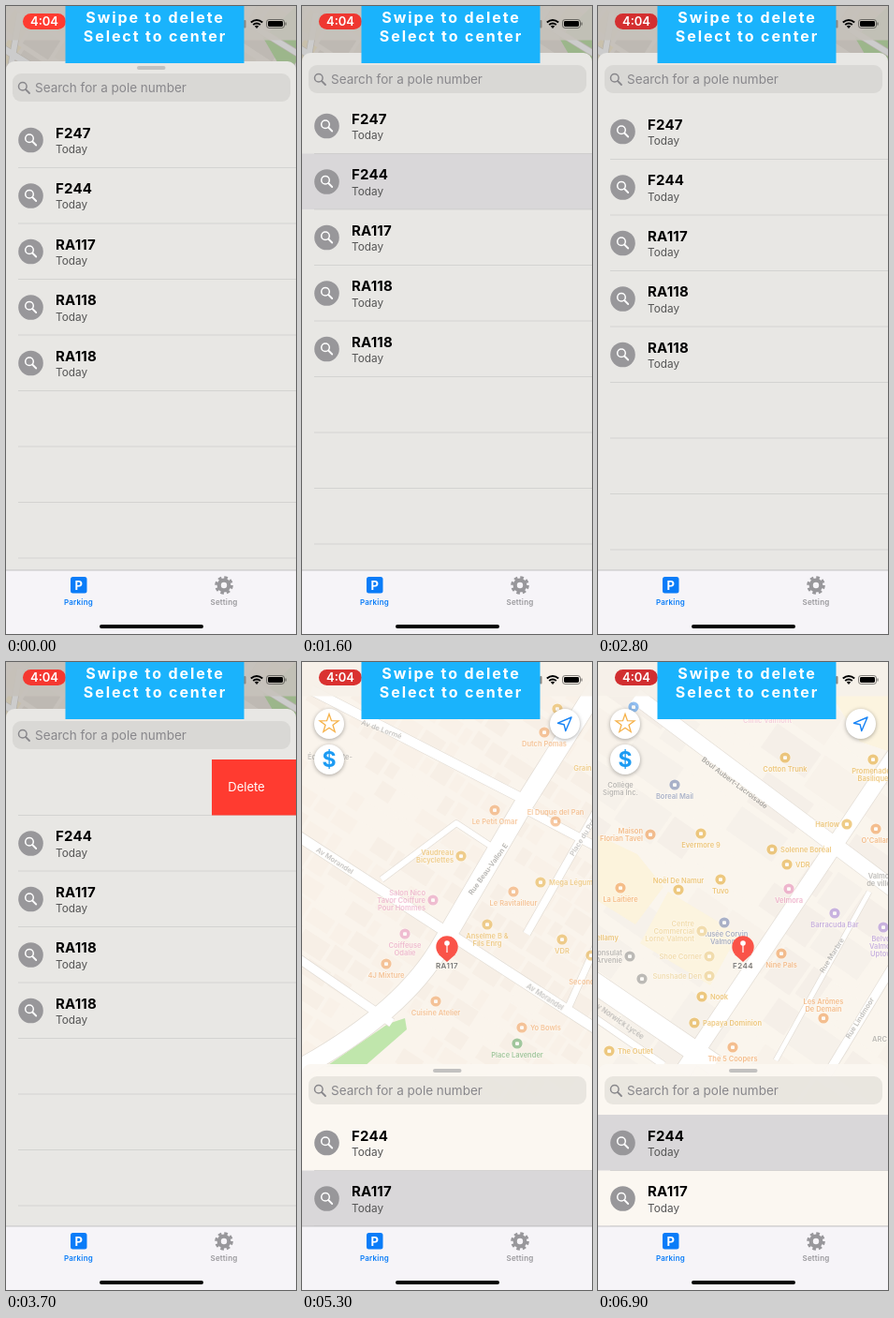
These frames come from a looping animation (310 px wide and 670 px high, 7000 ms). An HTML page:

```html
<!DOCTYPE html>
<html lang="en">
<head>
<meta charset="utf-8">
<title>Parking list</title>
<style>
html, body { margin: 0; width: 100%; height: 100%; overflow: hidden; }
svg { display: block; width: 100vw; height: 100vh; font-family: Inter, "Open Sans", sans-serif; }
.road path { fill: none; stroke-linejoin: round; }
.poi { font-size: 7.5px; font-weight: 600; paint-order: stroke; stroke: #fffaf2; stroke-width: 1.6px; stroke-linejoin: round; }
.mid { text-anchor: middle; }
.button { filter: drop-shadow(0 1px 2px #0005); }
.title { font-size: 15px; font-weight: 700; letter-spacing: .2px; }
.sub { font-size: 11.8px; fill: #555; }
.tab { font-size: 8px; font-weight: 600; letter-spacing: .2px; text-anchor: middle; }
.banner { font-size: 16px; font-weight: 700; letter-spacing: 1.9px; fill: #fff; text-anchor: middle; }
</style>
</head>
<body>
<svg id="stage" viewBox="0 0 310 670"></svg>
<script>
const ROW = 59.5;
const COLORS = {
  o: '#ef9448', y: '#e3a52c', p: '#e486b6', v: '#a583d6', m: '#6d7fae', g: '#4b9b52',
  k: '#8d8d8d', d: '#6a6a6a', b: '#3f8fe8', f: '#e8cb88', h: '#ebb2d2'
};

function random(seed) {
  return () => (seed = seed * 16807 % 2147483647) / 2147483647;
}

// Rotated rows of pale buildings
function buildings(seed, angle, size, fills) {
  const rnd = random(seed);
  let out = '';
  for (let y = -400; y < 400; y += size)
    for (let x = -400; x < 400;) {
      const w = size * (0.5 + rnd());
      const fill = fills[Math.floor(rnd() * fills.length)];
      out += `<rect x="${x}" y="${y + rnd() * 5}" width="${w - 4}" height="${size * (0.6 + rnd() * 0.25)}" fill="${fill}"/>`;
      x += w;
    }
  return `<g transform="translate(155 230) rotate(${angle})">${out}</g>`;
}

function roads(list) {
  const draw = (color, extra) => list.map(([d, w, c]) =>
    `<path d="M${d}" stroke="${color || c || '#fff'}" stroke-width="${w + extra}"/>`).join('');
  return `<g class="road">${draw('#e3ddd5', 1.4)}${draw('', 0)}</g>`;
}

const area = (points, fill) => `<polygon points="${points}" fill="${fill}"/>`;

// Each line: x, y, side of the text (or angle of a street name), colour, text
function labels(id, source) {
  return `<g id="${id}">` + source.trim().split('\n').map(line => {
    const [x, y, side, color, ...words] = line.trim().split(' ');
    const rows = words.join(' ').split('|');
    const fill = COLORS[color];
    const text = (tx, ty, anchor) => rows.map((row, i) =>
      `<text x="${tx}" y="${ty + i * 8}" text-anchor="${anchor}">${row}</text>`).join('');
    if (!isNaN(side))
      return `<g class="poi" fill="${fill}" transform="translate(${x} ${y}) rotate(${side})">${text(0, 2.5, 'middle')}</g>`;
    const n = rows.length - 1, px = +x, py = +y;
    const body = {
      l: () => text(px + 9, py + 2.7 - n * 4, 'start'),
      r: () => text(px - 8, py + 2.7 - n * 4, 'end'),
      b: () => text(px, py + 14.5, 'middle'),
      t: () => text(px, py - 7.5 - n * 8, 'middle')
    }[side]();
    return `<g class="poi" fill="${fill}"><circle cx="${x}" cy="${y}" r="5.6"/>
      <rect x="${px - 2}" y="${py - 1.8}" width="4" height="3.8" rx="1" fill="#fff" stroke="none"/>${body}</g>`;
  }).join('') + '</g>';
}

const pin = name => `<path d="M146 312 L155 320 L164 312Z" fill="#f4544a"/>
  <circle cx="155" cy="304" r="11.7" fill="#fa5348"/><circle cx="155" cy="300" r="2.8" fill="#fff"/>
  <path d="M155 302V310" stroke="#fff" stroke-width="1.2"/>
  <text class="poi mid" x="155" y="327" fill="#777" style="font-size:8px;letter-spacing:.4px">${name}</text>`;

const base = fill => `<rect x="-100" y="-100" width="510" height="870" fill="${fill}"/>`;

const home = base('#f8f2ea') + buildings(7, 33, 31, ['#f1ebe3', '#eee8e0', '#f5efe6', '#faf0d8']) +
  area('160,369 197,338 258,383 232,429', '#c3e4ae') +
  area('310,342 310,425 262,425', '#c3e4ae') +
  area('275,62 310,28 310,122', '#c3e4ae') +
  '<path d="M180 354L238 415M228 361L195 395" stroke="#e4f0d8"/>' +
  roads([
    ['-10 69L320 273', 7], ['-10 120L320 324', 6], ['-10 321L160 427', 6],
    ['268 20L25 425', 8], ['330 62L235 215L120 405', 6], ['345 215L222 425', 11],
    ['200 10L330 90', 6], ['-10 256L65 303L150 364L228 432', 8, '#fdf3cf'], ['-10 180L15 36', 6]
  ]) +
  `<g stroke="#a9c4e2" fill="#dbe4ea" transform="translate(146 303) rotate(-57)">
    <rect x="-27" y="-17" width="54" height="34"/><path d="M-27 -6H27M-27 6H27" stroke-width=".8"/></g>` +
  labels('homeText', `
    55 160 33 k Rue Bellamont
    78 124 33 k Av Norwick Lycée
    22 343 33 k Rue Fenwick
    5 190 33 k Rue Tilmont
    260 180 -58 k Rue Lindmoor
    247 152 -58 k Rue Marbre
    297 300 -57 d Boul Aurel
    3 85 -70 d moor O
    171 100 r o Maison|Florian Tavel
    193 100 l y Evermore 9
    230 124 r p Velmora
    135 128 l y Brim
    206 157 r m Musée Corvin|Valmont
    135 182 t y Centorama
    206 191 t o The 5 Coopers
    146 199 b y Place Valmont|Court
    194 221 l o Lou & Marty's
    132 240 r y La Maison Perrau
    186 236 b y Shoe Corner
    131 260 b p
    182 79 b m
    61 263 b m Poupée Expo
    23 251 b b
    97 302 b y Twigs
    163 288 b o Finn's Famous
    138 317 l y Boreal Heron
    230 314 b k Fair Day|Building
    71 348 b y Ovelia
    102 341 b y K&B
    144 372 r o Cove Pub
    60 378 r y Ophelia's|Closet
    58 408 l y Sandra Belleval
    197 364 b g Square Dunmorrow
    287 288 r o The Vat|Steakhouse
    73 217 t v Le St-Valier|Hotel|Bellerive
    23 297 b v Sylvane
    270 141 l v Belvoir|Valmont|Uptown
    278 183 l k ARC Tram
    306 68 b g Square Pomme
    298 109 0 o Tapanada
    303 214 0 o Les Trois`) +
  `<rect x="56" y="294" width="18" height="19" rx="3" fill="#228a63" stroke="#fff"/>
  <text class="mid" x="65" y="310" font-size="8" font-weight="700" fill="#fff">112</text>
  <circle cx="147" cy="311" r="40" fill="#5aa0dc" opacity=".25"/>
  <circle cx="145.5" cy="312" r="10" fill="#fff"/><circle cx="145.5" cy="312" r="7.5" fill="#087cf5"/>
  <path d="M144 304l5 -3v5z" fill="#087cf5"/>`;

const market = base('#faf4ec') + buildings(19, 33, 25, ['#f9f1e8', '#f7efe6', '#faf4ec']) +
  area('25,432 92,386 110,380 112,392 66,432', '#c0e6ac') +
  roads([
    ['-10 182L320 395', 11], ['10 30L240 148', 10], ['235 155L320 200', 9],
    ['320 150L240 290', 8], ['-10 312L96 385', 9], ['85 232L165 172L212 203', 6],
    ['320 20L235 155L150 300Q108 375 -10 438', 20], ['320 290L285 368', 7]
  ]) +
  labels('marketText', `
    199 221 -54 d Rue Beau-Vallon E
    35 212 33 k Av Morandel
    260 357 33 k Av Morandel
    85 72 20 k Av de Lormé
    300 187 -58 k Place du Pré
    30 101 0 k École Sainte-
    300 113 0 y Grain
    259 75 b o Dutch Pomas
    273 50 b y
    206 158 b o Le Petit Omar
    271 170 t o El Duque del Pan
    170 207 r y Vaudreau|Bicyclettes
    140 254 r p Salon Nico|Tavor Coiffure|Pour Hommes
    226 245 b o Le Ravitailleur
    255 235 l y Mega Légumes
    278 296 b y VDR
    110 290 b p Coiffeuse|Odalie
    198 280 b y Anselme B &|Fils Enrg
    90 322 b o 4J Mixture
    143 362 b o Cuisine Atelier
    235 390 l o Yo Bowls
    230 407 b g Place Lavender
    309 313 b y
    299 341 0 o Second`) +
  pin('RA117');

const downtown = base('#faf5ed') + buildings(31, 35, 48, ['#f6f1ea', '#f8f2ea', '#f5efe8', '#faf5ed']) +
  area('0,185 42,205 70,240 40,280 0,255', '#fcf3dc') +
  area('75,245 150,290 120,345 45,300', '#fcf4df') +
  area('250,36 310,36 310,95 280,85', '#fcf4df') +
  roads([
    ['40 36L330 253', 17], ['325 88L90 438', 17], ['-10 338L125 430', 22],
    ['-10 375L70 430', 7], ['290 245L190 425', 5], ['330 300L245 440', 9]
  ]) +
  labels('downtownText', `
    146 129 37 d Boul Aubert-Lacroisade
    22 382 35 k Av Norwick Lycée
    250 313 -58 k Rue Marbre
    280 380 -58 k Rue Lindmoor
    181 62 0 h Clinic Valmont
    38 48 b b
    200 102 b y Cotton Trunk
    294 104 b y Promenades|Basilique
    82 131 b m Boreal Mail
    24 131 0 k Collège|Sigma Inc.
    56 184 r o Maison|Florian Tavel
    110 183 b y Evermore 9
    266 173 r y Harlow
    297 178 b o O'Callan
    186 200 l y Solenne Boréal
    202 216 l y VDR
    86 243 t y Noël De Namur
    131 232 b y Tuvo
    24 241 b o La Laitière
    204 242 b p Velmora
    253 268 b v Barracuda Bar
    305 283 b v Belvoir|Valmont|Uptown
    300 228 0 k Valmo|de ville
    135 278 b m Musée Corvin|Valmont
    111 287 r f Centre|Commercial|Lorne Valmont
    119 314 r f Shoe Corner
    119 335 r f Sunshade Den
    196 311 b o Nine Pals
    111 357 l y Nook
    103 385 l y Papaya Dominion
    241 380 t o Les Arômes|De Demain
    12 415 l y The Outlet
    144 411 b o The 5 Coopers
    34 314 r k Consulat|d'Arvenie
    10 294 0 y ellamy
    47 338 b k
    301 402 0 k ARC`) +
  pin('F244');

const lens = (x, y, s, color) => `<g transform="translate(${x} ${y}) scale(${s})" fill="none" stroke="${color}" stroke-linecap="round">
  <circle cx="-1.2" cy="-1.2" r="4.3" stroke-width="1.5"/><path d="M2 2L6 6" stroke-width="1.8"/></g>`;

const row = (name, i) => `<g id="row${i}"><circle cx="26.5" cy="84" r="13.3" fill="#98979a"/>${lens(26.2, 83.5, 1, '#fff')}
  <text class="title" x="53" y="81.7">${name}</text><text class="sub" x="53" y="98">Today</text></g>`;

const button = (x, y, inner) =>
  `<g transform="translate(${x} ${y})"><circle class="button" r="16" fill="#fff"/>${inner}</g>`;

const star = Array.from({ length: 10 }, (_, i) => {
  const r = i % 2 ? 4.2 : 10.5, a = i * Math.PI / 5;
  return `${r * Math.sin(a)},${-r * Math.cos(a)}`;
}).join(' ');

const separators = Array.from({ length: 9 }, (_, i) =>
  `<path d="M13 ${113.5 + i * ROW}H310" stroke="#b9b8b8" stroke-opacity=".55" stroke-width=".8"/>`).join('');

document.getElementById('stage').innerHTML = `
<g id="home">${home}</g><g id="market">${market}</g><g id="downtown">${downtown}</g>
<g id="buttons">
  ${button(29, 66, `<polygon points="${star}" fill="none" stroke="#f6b24a" stroke-width="1.3"/>`)}
  ${button(29, 104, '<text class="mid" y="8" font-size="23" font-weight="700" fill="#1c9bf3">$</text>')}
  <g id="locate">${button(281, 66, '<path d="M7 -7L-7.5 -0.8L-0.8 0.8L0.8 7.5Z" fill="none" stroke="#1683f5" stroke-width="1.4" stroke-linejoin="round"/>')}</g>
</g>
<rect width="310" height="36.5" fill="#f7f1e9" opacity=".9"/>
<rect id="dim" width="310" height="670"/>
<g id="sheet">
  <rect id="panel" width="310" height="700" rx="9"/>
  <rect x="140" y="5" width="30.5" height="4" rx="2" fill="#c2c1c0"/>
  <rect x="7" y="13" width="297" height="30" rx="9" fill="#767670" fill-opacity=".13"/>
  ${lens(19, 28, 1, '#88878b')}
  <text x="31" y="33" font-size="13.5" fill="#88878b">Search for a pole number</text>
  <g id="list">
    <rect id="mark" width="310" height="${ROW}" fill="#d9d7d9"/>
    ${separators}
    <g id="trash"><rect id="red" y="54" height="${ROW}" fill="#ff3b30"/>
      <text id="delete" class="mid" y="88" font-size="13" fill="#fff">Delete</text></g>
    ${['F247', 'F244', 'RA117', 'RA118', 'RA118'].map(row).join('')}
  </g>
</g>
<rect y="602" width="310" height="68" fill="#f6f4f8"/>
<path d="M0 602H310" stroke="#b8b7ba" stroke-width=".8"/>
<rect x="69" y="609" width="17.5" height="17.5" rx="2.5" fill="#0a7cf8"/>
<text class="mid" x="77.8" y="622.5" font-size="13" font-weight="700" fill="#fff">P</text>
<text class="tab" x="77.5" y="639.2" fill="#0a7cf8">Parking</text>
<g fill="none" stroke="#98979b"><circle cx="233" cy="618" r="5.3" stroke-width="4.2"/>
  <circle cx="233" cy="618" r="8.3" stroke-width="3" stroke-dasharray="3.6 2.92"/></g>
<text class="tab" x="233" y="639.2" fill="#98979b">Setting</text>
<rect x="100" y="660" width="111" height="4" rx="2"/>
<rect id="pill" x="18" y="8" width="46" height="17" rx="8.5"/>
<text class="mid" x="41" y="21.2" font-size="13" font-weight="600" fill="#fff">4:04</text>
<rect x="254" y="15" width="2.5" height="8.5" rx="1" fill="#8b8782"/>
<g fill="none" stroke="#000" stroke-width="2"><path d="M261.8 17.6Q268 12.3 274.2 17.6M264.2 20Q268 17 271.8 20"/></g>
<path d="M265.8 21.6Q268 20 270.2 21.6L268 24Z"/>
<rect x="278.5" y="14.5" width="19" height="9" rx="2.7" fill="none" stroke="#0007"/>
<rect x="280" y="16" width="16" height="6" rx="1.4"/><path d="M299 17.5v3" stroke="#0007" stroke-width="1.3"/>
<rect x="63.5" width="191" height="61" fill="#1ab3fc"/>
<text class="banner" x="159.5" y="18">Swipe to delete</text><text class="banner" x="159.5" y="38">Select to center</text>`;

const el = Object.fromEntries([...document.querySelectorAll('[id]')].map(e => [e.id, e]));
const set = (id, attrs) => { for (const k in attrs) el[id].setAttribute(k, attrs[k]); };
const mix = (a, b, p) => a + (b - a) * p;
const rgb = (a, b, p) => `rgb(${a.map((v, i) => Math.round(mix(v, b[i], p)))})`;

// Eased value between [time, value] keys
function at(t, ...keys) {
  let prev = keys[0];
  for (const key of keys) {
    if (t < key[0]) {
      const p = Math.max(0, (t - prev[0]) / (key[0] - prev[0]));
      return mix(prev[1], key[1], p * p * (3 - 2 * p));
    }
    prev = key;
  }
  return prev[1];
}

function render(t) {
  const top = at(t, [0, 59], [200, 50], [1650, 50], [2100, 417], [2250, 429], [2450, 429], [2800, 50], [4750, 50], [5200, 429]);
  const open = Math.min(1, Math.max(0, (429 - top) / 370));
  const scroll = at(t, [1200, 0], [1600, -6], [1700, -6], [1900, 0]);
  const swipe = at(t, [3200, 0], [3600, -90], [3800, -90], [4000, -310]);
  const gone = at(t, [4000, 0], [4300, 1]);

  set('home', { transform: `translate(0 ${-28 * open})` });
  set('homeText', { opacity: 1 - open });
  set('market', { opacity: at(t, [4900, 0], [5200, 1]) });
  set('marketText', { opacity: at(t, [5000, 0], [5600, 1]) });
  const zoom = at(t, [6450, 0.75], [6850, 1]);
  set('downtown', {
    opacity: at(t, [6450, 0], [6750, 1]),
    transform: `translate(155 304) scale(${zoom}) translate(-155 -304)`
  });
  set('downtownText', { opacity: at(t, [6600, 0], [7150, 1]) });
  set('buttons', { opacity: 1 - open });
  set('locate', { opacity: t > 4900 ? 1 : 0 });
  set('dim', { opacity: 0.2 * open });
  set('panel', { fill: rgb([251, 247, 242], [232, 231, 228], open), 'fill-opacity': mix(0.95, 1, open) });
  set('sheet', { transform: `translate(0 ${top})` });
  set('list', { transform: `translate(0 ${scroll})` });

  const marked = t >= 1500 && t < 1700 || t >= 6400 ? 1 : t >= 4750 ? 2 : -1;
  set('mark', { opacity: marked < 0 ? 0 : 1, y: 54 + ROW * (marked - (t > 4300 ? 1 : 0)) });

  for (let i = 0; i < 5; i++)
    set('row' + i, { transform: `translate(${i ? 0 : swipe} ${ROW * (i - (i ? gone : 0))})` });
  set('row0', { opacity: gone ? 0 : 1 });
  set('red', { x: 310 + swipe, width: -swipe, height: ROW * (1 - gone) });
  set('delete', { x: Math.max(347 + swipe, 45) });
  set('trash', { opacity: swipe && gone < 1 ? 1 - gone : 0 });
  set('pill', { fill: rgb([255, 59, 48], [208, 46, 48], 0.5 - 0.5 * Math.cos(t / 1000 * Math.PI)) });
}

const start = performance.now();
function frame() {
  render((performance.now() - start) % 7000);
  requestAnimationFrame(frame);
}
frame();
</script>
</body>
</html>
```
